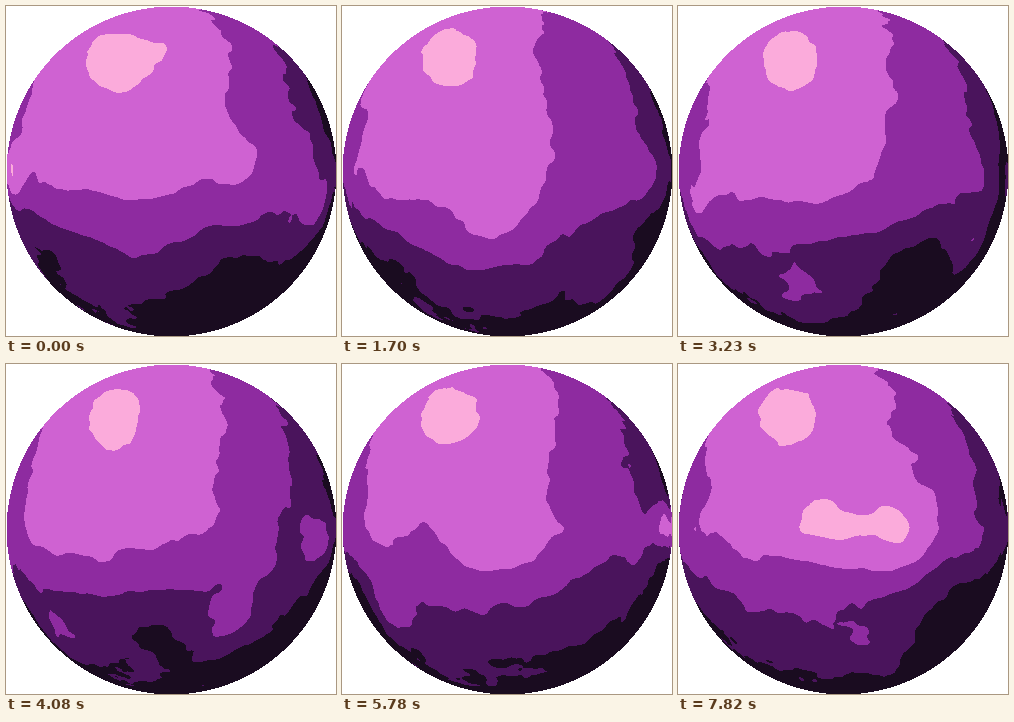
An HTML page with a canvas for the animation above (7.99 s loop, 330x330 px).

```html
<!DOCTYPE html>
<html lang="en">
<head>
<meta charset="utf-8">
<title>Turning planet</title>
<style>
  html, body { margin: 0; width: 100%; height: 100%; overflow: hidden; background: #fff; }
  canvas { display: block; width: 330px; height: 330px; }
</style>
</head>
<body>
<canvas id="stage" width="330" height="330"></canvas>
<script>
const SIZE = 330, MID = 165.5, RADIUS = 164.9;
const STEP = 170, LOOP = 7990, TURN = 1 / 15;
const AROUND = 4; // surface length of one full turn
const LIGHT = { x: 108, y: 52 };
const COLORS = [[251, 171, 219], [207, 98, 210], [142, 43, 160], [74, 20, 92], [26, 12, 32]];

// Main landmarks; negative depth is brighter ground.
const LANDMARKS = [
  { u: 0, v: -.45, r: .15, depth: -.2 },
  { u: .2, v: -.03, r: .13, depth: -.15 },
  { u: .2, v: .4, r: .17, depth: .17 },
  { u: .6, v: .2, r: .16, depth: -.27 },
  { u: .8, v: -.43, r: .13, depth: .2 },
  { u: 1.1, v: .47, r: .13, depth: -.25 },
  { u: 1.22, v: -.01, r: .11, depth: -.13 },
  { u: 1.5, v: .32, r: .18, depth: .17 },
  { u: 1.8, v: .33, r: .11, depth: -.27 },
  { u: 2, v: 0, r: .12, depth: .13 },
  { u: 2.25, v: .08, r: .1, depth: -.18 },
  { u: 3, v: -.02, r: .11, depth: -.38 },
  { u: 3.22, v: -.01, r: .14, depth: -.47 },
  { u: 3.15, v: .42, r: .14, depth: -.2 },
  { u: 3.45, v: -.27, r: .13, depth: -.17 },
  { u: 3.5, v: .3, r: .2, depth: .15 }
];

const wrap = (n, m) => ((n % m) + m) % m;
const mix = (a, b, t) => a + (b - a) * t;
const smooth = t => t * t * (3 - 2 * t);

function hash(x, y) {
  const s = Math.sin(x * 12.9898 + y * 78.233) * 4375.85;
  return s - Math.floor(s) - .5;
}

function noise(u, v, density) {
  const x = u * density, y = v * density, i = Math.floor(x), j = Math.floor(y);
  const fx = smooth(x - i), at = (a, b) => hash(wrap(a, AROUND * density), b);
  return mix(mix(at(i, j), at(i + 1, j), fx), mix(at(i, j + 1), at(i + 1, j + 1), fx), smooth(y - j));
}

function fractal(u, v) {
  let sum = 0;
  for (let density = 8, size = .1; density <= 32; density *= 2, size *= .6) sum += size * noise(u, v, density);
  return sum;
}

function landmarks(u, v) {
  let sum = 0;
  for (const m of LANDMARKS) {
    const du = wrap(u - m.u + AROUND / 2, AROUND) - AROUND / 2, dv = v - m.v;
    sum += m.depth * Math.exp(-(du * du + dv * dv) / (m.r * m.r));
  }
  return sum;
}

// A bright belt lies along the equator.
const belt = v => .96 - .19 * Math.exp(-(((v - .02) / .17) ** 2));

// The surface is baked once and then scrolled under a fixed light.
const RES = 150, W = AROUND * RES, H = 2 * RES + 2;
const surface = new Float32Array(W * H);
for (let y = 0; y < H; y++) {
  for (let x = 0; x < W; x++) {
    const u = x / RES, v = y / RES - 1;
    surface[y * W + x] = belt(v) + landmarks(u, v) + fractal(u, v);
  }
}

function sample(u, v) {
  const x = wrap(u, AROUND) * RES, y = (v + 1) * RES;
  const i = Math.floor(x) % W, j = Math.floor(y), fx = x - Math.floor(x);
  const k = (i + 1) % W, top = j * W, low = top + W;
  return mix(mix(surface[top + i], surface[top + k], fx), mix(surface[low + i], surface[low + k], fx), y - j);
}

const ctx = document.getElementById('stage').getContext('2d');
const image = ctx.createImageData(SIZE, SIZE);
const disc = [];
for (let y = 0; y < SIZE; y++) {
  for (let x = 0; x < SIZE; x++) {
    const cx = (x + .5 - MID) / RADIUS, cy = (y + .5 - MID) / RADIUS, r2 = cx * cx + cy * cy;
    if (r2 >= 1) continue;
    const z = 1 + Math.sqrt(1 - r2);
    const rim = 1 + .3 * r2 ** 6 * cx * cx;
    const shade = rim * (Math.hypot(x - LIGHT.x, y - LIGHT.y) + 50) / 75;
    disc.push({ at: 4 * (y * SIZE + x), u: cx / z, v: cy / z, shade });
  }
}

function draw(step) {
  const shift = step * TURN;
  for (const p of disc) {
    const level = Math.floor(p.shade * sample(p.u + shift, p.v));
    const [r, g, b] = COLORS[Math.max(0, Math.min(4, level))];
    image.data[p.at] = r;
    image.data[p.at + 1] = g;
    image.data[p.at + 2] = b;
    image.data[p.at + 3] = 255;
  }
  ctx.putImageData(image, 0, 0);
}

let shown = -1;
function tick() {
  const step = Math.floor(performance.now() % LOOP / STEP);
  if (step !== shown) draw(shown = step);
  requestAnimationFrame(tick);
}
tick();
</script>
</body>
</html>
```
